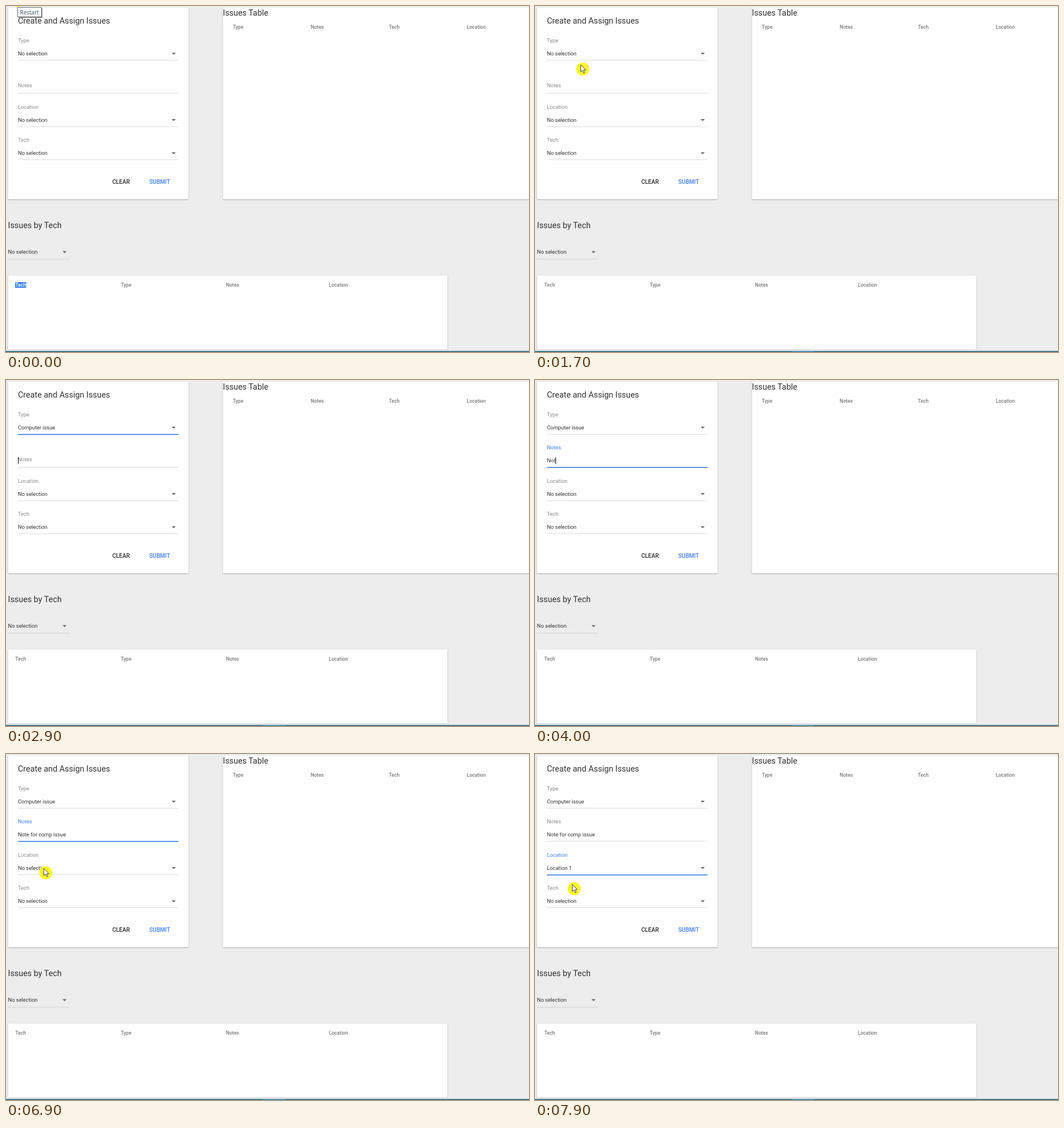
Recreate the animation shown at these times as an HTML page. Size 920x609 px, loop 8000 ms.

```html
<!DOCTYPE html>
<html lang="en">
<head>
<meta charset="utf-8">
<title>Issue form</title>
<style>
html, body { margin: 0; width: 100%; height: 100%; overflow: hidden; background: #ededed; }
svg { display: block; font-family: Roboto, sans-serif; }
.title { font-size: 14.4px; fill: #333; }
.value, .label, .active { font-size: 9.36px; fill: #333; }
.label { fill: #8a8a8a; }
.head { font-size: 8.64px; font-weight: 500; fill: #7a7a7a; }
.button { font-size: 10.08px; font-weight: 500; fill: #2a2a2a; }
.active, .submit { fill: #3f80f5; }
.selected { fill: #fff; }
.tip { font: 10px "Open Sans", sans-serif; fill: #4a5868; }
.card { fill: #fefefe; filter: drop-shadow(0 1px 1px rgba(0, 0, 0, .28)); }
.menu { fill: #fff; filter: drop-shadow(0 1px 2px rgba(0, 0, 0, .45)); }
</style>
</head>
<body>
<svg id="stage" width="920" height="609" viewBox="0 0 920 609"></svg>
<script>
const LOOP = 8000, STEP = 100;
const NONE = 'No selection';
const ROW = 58.4;  // distance between form fields
const stage = document.getElementById('stage');
const pen = document.createElement('canvas').getContext('2d');

// Each burst is typed at an even pace
const bursts = [
  { from: 3800, to: 4500, keys: 'Note for ' },
  { from: 4700, to: 5300, keys: 'comp i' },
  { from: 5500, to: 6100, keys: 'ssue' },
];

// The pointer eases to each place and rests there
const moves = [
  { from: 300, to: 600, x: 95, y: 155 },
  { from: 1400, to: 1900, x: 78, y: 87 },
  { from: 2100, to: 2400, x: 76, y: 122 },
  { from: 2600, to: 2900, x: 76, y: 150 },
  { from: 6500, to: 6900, x: 70, y: 209 },
  { from: 7200, to: 7700, x: 69, y: 237 },
];

const clamp = v => Math.min(1, Math.max(0, v));
const during = (t, from, to) => t >= from && t < to;
const progress = (t, { from, to }) => clamp((t - from) / (to - from));

const text = (x, y, s, cls) => `<text x="${x}" y="${y}" class="${cls}">${s}</text>`;
const rect = (x, y, w, h, fill, more = '') =>
  `<rect x="${x}" y="${y}" width="${w}" height="${h}" fill="${fill}" ${more}/>`;
const card = (x, y, w, h) => rect(x, y, w, h, '', 'rx="1" class="card"');
const arrow = (x, y) => `<path d="M${x - 3.6} ${y - 1.6}h7.2l-3.6 3.6z" fill="#666"/>`;
const heads = (y, names, xs) => names.map((name, i) => text(xs[i], y, name, 'head')).join('');

// One form field: its label, value and underline
function field(row, label, value, labelOn, lineOn, floats = true) {
  const y = Math.round(64 + row * ROW);
  const line = lineOn ? rect(21, y + 31, 282.5, 1.6, '#3b7be6') : rect(21, y + 31, 282.5, 1, '#dedede');
  return text(21, floats ? y : y + 21, label, labelOn ? 'active' : 'label')
    + text(21, y + 23, value, 'value') + line;
}

function select(row, label, value, labelOn, lineOn) {
  return field(row, label, value, labelOn, lineOn) + arrow(295, 83.8 + row * ROW);
}

function notes(t) {
  const focused = during(t, 3000, 7200);
  const typed = bursts.map(b => t < b.from ? ''
    : b.keys.slice(0, 1 + Math.floor((b.keys.length - 1) * progress(t, b)))).join('');
  const caret = during(t, 2900, 3200) || during(t, 3600, 6600);
  pen.font = '9.36px Roboto, sans-serif';
  return field(1, 'Notes', typed, focused, focused, t >= 3000)
    + (caret ? rect(Math.floor(21 + pen.measureText(typed).width), 136, 1, 12, '#111') : '');
}

function menu(y, items) {
  return rect(21, y, 109, 148, '', 'class="menu"') + rect(21, y + 1, 109, 34, '#f2f2f2')
    + items.map((item, i) => text(42.5, y + 21 + i * 34, item, 'value')).join('');
}

function pointer(t) {
  if (during(t, 2800, 6600)) return '';
  let x = 19, y = -10;
  for (const move of moves) {
    const k = progress(t, move), ease = k * k * (3 - 2 * k);
    x += (move.x - x) * ease;
    y += (move.y - y) * ease;
  }
  return `<circle cx="${x}" cy="${y}" r="11.5" fill="#fbf41c" opacity=".94"/>
    <path transform="translate(${x - 3.5} ${y - 7.5})" d="M0 0V12.5L3 9.8L5 14.5L7 13.6L5 9.2H9Z"
      fill="#fff" stroke="#333" stroke-width=".9"/>`;
}

function form(t) {
  return card(3.5, 2.5, 317.5, 337.5) + text(21, 31, 'Create and Assign Issues', 'title')
    + select(0, 'Type', t < 2400 ? NONE : 'Computer issue', during(t, 2100, 2800), during(t, 2100, 3000))
    + notes(t)
    + select(2, 'Location', t < 7700 ? NONE : 'Location 1', t >= 7200, t >= 7200)
    + select(3, 'Tech', NONE)
    + text(187, 313, 'CLEAR', 'button') + text(252, 313, 'SUBMIT', 'button submit');
}

function issuesTable() {
  return card(381.5, 2.5, 560, 337.5) + text(381.5, 17, 'Issues Table', 'title')
    + heads(40, ['Type', 'Notes', 'Tech', 'Location'], [399, 536, 673.5, 810.5]);
}

function issuesByTech(t) {
  const selection = rect(16, 486, 19.5, 10, '#3b82ee') + text(16.5, 494, 'Tech', 'head selected');
  return text(3.5, 391, 'Issues by Tech', 'title')
    + text(3.5, 436, NONE, 'value') + arrow(103, 433) + rect(3, 445, 109, 1, '#d4d4d4')
    + card(3.5, 474.5, 773, 130)
    + heads(494, ['Tech', 'Type', 'Notes', 'Location'], [16.5, 202, 387, 568])
    + (t < 1400 ? selection : '');
}

function taskbar(t) {
  return rect(0, 605, 920, 2, '#e4e8e9') + rect(0, 607.4, 920, 1.6, '#1f6075')
    + (t < 1400 ? '' : rect(452, 607.4, 40, 1.6, '#3f93bd'));
}

function tooltip() {
  return rect(22, 4, 42, 17, '#8a8a8a') + rect(20.5, 2.5, 42, 16.5, '#fff', 'stroke="#707070"')
    + text(24.5, 14.5, 'Restart', 'tip');
}

function scene(t) {
  return form(t) + issuesTable() + issuesByTech(t) + taskbar(t)
    + (during(t, 2100, 2400) ? menu(74, [NONE, 'Computer issue', 'Wiring issue', 'Network issue']) : '')
    + (during(t, 7200, 7900) ? menu(191, [NONE, 'Location 1', 'Location 2', 'Location 3']) : '')
    + pointer(t) + (t < 300 ? tooltip() : '');
}

let shown = -1;
function frame() {
  const t = Math.floor(performance.now() % LOOP / STEP) * STEP;
  if (t !== shown) stage.innerHTML = scene(shown = t);
  requestAnimationFrame(frame);
}
frame();
</script>
</body>
</html>
```
